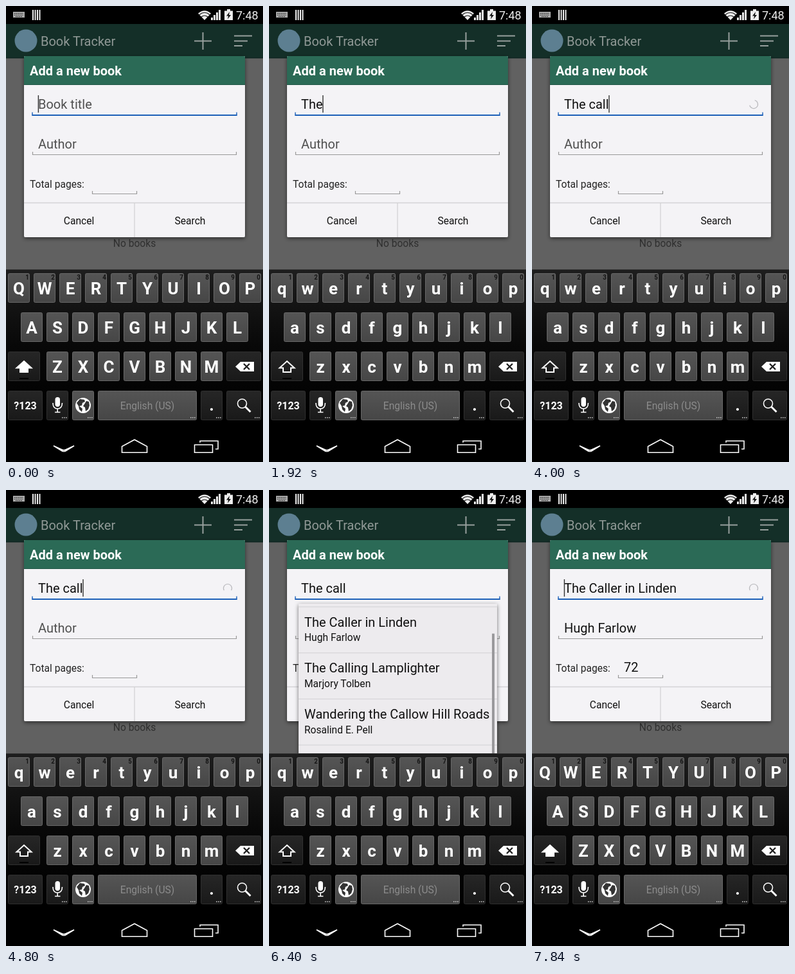
Animation, 400 px wide and 710 px high, one loop 8 s. Source, as an HTML page:

```html
<!DOCTYPE html>
<html lang="en">
<head>
<meta charset="utf-8">
<title>Add a new book</title>
<style>
html, body { margin: 0; width: 100%; height: 100%; overflow: hidden; background: #000; }
svg { display: block; width: 100vw; height: 100vh; }
text { font: 20px Roboto, "Noto Sans", sans-serif; white-space: pre; }
.small { font-size: 15.6px; }
.bold { font-weight: 700; }
.mid { text-anchor: middle; }
.letter { font-size: 26px; font-weight: 700; fill: #fff; text-anchor: middle; }
.line { fill: none; stroke: #fff; stroke-width: 1.6; }
</style>
</head>
<body>
<svg viewBox="0 0 400 710">
  <defs>
    <linearGradient id="light" x2="0" y2="1"><stop stop-color="#555"/><stop offset="1" stop-color="#464646"/></linearGradient>
    <linearGradient id="dark" x2="0" y2="1"><stop stop-color="#262626"/><stop offset="1" stop-color="#191919"/></linearGradient>
    <linearGradient id="board" x2="0" y2="1"><stop stop-color="#1e1e1e"/><stop offset=".5" stop-color="#080808"/><stop offset="1" stop-color="#000"/></linearGradient>
    <filter id="shadow" x="-10%" y="-10%" width="120%" height="120%"><feDropShadow dx="0" dy="2" stdDeviation="3" flood-opacity=".55"/></filter>
  </defs>
  <rect width="400" height="710"/>

  <!-- status bar -->
  <path d="M11 9h18v9H11z" fill="#aaa"/>
  <path d="M13 11.5h14M13 14h14M15 16.5h10" stroke="#111" stroke-dasharray="1.5 1.2"/>
  <path d="M42 6v16M45.500 6v16M49 6v16M52.500 6v16" stroke="#eee" stroke-width="2"/>
  <path d="M299 11.500Q309 3 319 11.500L309 22z" fill="#eee"/>
  <path d="M301 13.500Q309 7 317 13.500M304 17Q309 13 314 17" fill="none" stroke="#111" stroke-width="1.200"/>
  <path d="M320.500 22v-4M324.500 22v-8M328.500 22V10M332.500 22V6" stroke="#eee" stroke-width="3"/>
  <path d="M340 7.500h4V5h5v2.500h4V22h-13z" fill="#eee"/>
  <path d="M348 9l-5 6.500h3l-1 5 5-6.500h-3z" fill="#111"/>
  <text x="358" y="21" fill="#eee" style="font-size:18px">7:48</text>

  <!-- dimmed app -->
  <rect y="28" width="400" height="53" fill="#142f28"/>
  <rect y="81" width="400" height="330" fill="#616161"/>
  <rect y="80" width="400" height="1.500" fill="#0d2520"/>
  <circle cx="31" cy="54" r="17.500" fill="#5d7f91"/>
  <text x="54" y="62" fill="#909996">Book Tracker</text>
  <path d="M293 54.500h27M306.500 41v27M355 46.500h28M355 54.500h21M355 62h13" stroke="#97a09d" stroke-width="2"/>
  <text x="200" y="375" class="small mid" fill="#2f2f2f">No books</text>

  <!-- dialog -->
  <rect x="28" y="78" width="344" height="282" rx="2" fill="#f4f3f6" filter="url(#shadow)"/>
  <path d="M28 122V80q0-2 2-2h340q2 0 2 2v42z" fill="#2b6a56"/>
  <path d="M28 122.500h344" stroke="#1f5545"/>
  <text x="37" y="108" class="bold" fill="#fff">Add a new book</text>
  <path d="M41 165.500v4.500h318v-4.500" fill="none" stroke="#1b5fb8" stroke-width="1.400"/>
  <path d="M40.500 170h319" stroke="#1b5fb8" stroke-width="2.200"/>
  <path d="M41.500 227v4.500h317V227M134.500 288v4.500h69V288" fill="none" stroke="#989898" stroke-width="1.200"/>
  <text id="title" x="50" y="160"></text>
  <text id="author" x="50" y="222"></text>
  <text x="37" y="283" class="small" fill="#222">Total pages:</text>
  <text id="pages" x="143" y="283" fill="#111"></text>
  <rect id="caret" y="139" width="1.400" height="27" fill="#333"/>
  <path id="spinner" d="M3.250 5.630A6.500 6.500 0 1 1 3.250 -5.630" fill="none" stroke="#b9b9bd" stroke-width="1.200"/>
  <path d="M28 306.500h344M200 307v53" stroke="#d3d2d5" stroke-width="1.300"/>
  <text x="113.500" y="340" class="small mid" fill="#111">Cancel</text>
  <text x="286.500" y="340" class="small mid" fill="#111">Search</text>

  <!-- suggestions -->
  <g id="list">
    <rect x="46" y="177" width="309" height="260" fill="#edebee" filter="url(#shadow)"/>
    <svg x="46" y="177" width="309" height="240"><g id="rows"></g></svg>
    <rect id="thumb" x="347" width="4" height="240" fill="#9a999c"/>
  </g>

  <!-- keyboard -->
  <rect y="410" width="400" height="300"/>
  <rect y="410" width="400" height="238" fill="url(#board)"/>
  <path d="M0 410.500h400" stroke="#333"/>
  <g id="keys"></g>
  <path id="shift" d="M28 553l11.500 10.500H34v6.500H22v-6.500h-5.500z" stroke="#fff" stroke-width="2"/>
  <path d="M21 580h14" stroke="#000" stroke-width="2"/>
  <path d="M357 561.500l8-7.500h21v15h-21z" fill="#fff"/>
  <path d="M370 557l9 9m0-9l-9 9" stroke="#222" stroke-width="2.400"/>
  <text x="30" y="628" class="bold mid" fill="#fff" style="font-size:16px">?123</text>
  <rect x="76.500" y="609" width="7.500" height="15" rx="3.700" fill="#fff"/>
  <path d="M73 618q0 9 7.200 9t7.300-9M80.200 627v5M76 632.500h8.500" class="line"/>
  <circle cx="120" cy="622" r="12" fill="#fff"/>
  <path d="M110 618l5-6 7 1 1 3-4 2-1 4-4 1 5 4-1 5-4-4-1-5zM122 620l3-5 4 1 1 6-2 6-4 3-1-6-3-2z" fill="#333"/>
  <text x="220" y="627.500" class="small mid" fill="#8c8c8c">English (US)</text>
  <text x="320" y="630" class="letter">.</text>
  <circle cx="367.500" cy="619" r="7" class="line"/>
  <path d="M372.500 624l8 8" class="line" style="stroke-width:3"/>

  <!-- navigation bar -->
  <g transform="translate(0 .7)">
    <path d="M74 684l13 6q3 1.500 6 0l13-6-13 8q-3 1.500-6 0z" class="line"/>
    <path d="M180.500 694.500V685L200 674.500 219.500 685v9.500z" class="line"/>
    <path d="M293.500 682.500h28v12h-28zM302 679v-2.500h28V689h-4" class="line"/>
  </g>
</svg>
<script>
const $ = id => document.getElementById(id);
const LOOP = 8000, STEP = 160, PITCH = 71.7;

const books = [
  ["The Caller at Low Meadows", "Marc-Émile Vaubrond"],
  ["The Caller in Linden", "Hugh Farlow"],
  ["The Calling Lamplighter", "Marjory Tolben"],
  ["Wandering the Callow Hill Roads", "Rosalind E. Pell"],
  ["The Caller in Linden", "Hugh Farlow"]
];
const picked = books[1];

$("rows").innerHTML = books.map(([name, writer], i) => {
  const y = i * PITCH;
  return `<text x="9" y="${y + 30}" fill="#111">${name}</text>
    <text x="9" y="${y + 52.5}" class="small" fill="#111">${writer}</text>
    <path d="M0 ${y + 71}h309" stroke="#d2d1d4"/>`;
}).join("");

const key = (x, y, w, fill) => `<rect x="${x + .5}" y="${y + .5}" width="${w - 1}" height="45" rx="2"
  fill="url(#${fill})" stroke="${fill === "light" ? "#686868" : "#303030"}"/>`;
const dots = (right, y) =>
  `<path d="M${right - 10} ${y}h8" stroke="#ccc" stroke-width="1.500" stroke-dasharray="1.600 1.400"/>`;

let board = "";
[["QWERTYUIOP", 3, 416], ["ASDFGHJKL", 23, 477], ["ZXCVBNM", 63, 538]].forEach(([row, left, y], r) => {
  [...row].forEach((c, i) => {
    const x = left + i * 40;
    board += key(x, y, 34, "light") + `<text class="letter" x="${x + 17}" y="${y + 33}">${c}</text>`;
    if (r === 0) board += `<text class="bold mid" x="${x + 30}" y="${y + 10}" fill="#161616" style="font-size:10px">${(i + 1) % 10}</text>`;
  });
});
board += key(3, 538, 50, "dark") + key(343, 538, 54, "dark") + key(3, 599, 54, "dark");
[[63, 34, "dark"], [103, 34, "light"], [143, 154, "light"], [303, 34, "dark"], [343, 54, "dark"]]
  .forEach(([x, w, fill]) => board += key(x, 599, w, fill) + dots(x + w, 641));
$("keys").innerHTML = board;
const letters = [...$("keys").querySelectorAll(".letter")];

// time of each keystroke
const strokes = [1120, 1440, 1760, 2240, 2720, 3040, 3360, 3680];
const query = "The call";
const LIST_ON = 5280, PICK = 7360, RELOAD = 7520;

const show = (id, on) => $(id).setAttribute("visibility", on ? "visible" : "hidden");
function field(id, value, hint) {
  $(id).textContent = value || hint;
  $(id).setAttribute("fill", value ? "#111" : "#505050");
}

function draw(t) {
  const done = t >= PICK;
  const count = strokes.filter(s => s <= t).length;
  const typed = query.slice(0, count);
  const listed = t >= LIST_ON && !done;

  field("title", done ? picked[0] : typed, "Book title");
  field("author", done ? picked[1] : "", "Author");
  $("pages").textContent = done ? "72" : "";

  const edit = done ? PICK : count ? strokes[count - 1] : -360;
  $("caret").setAttribute("x", 49.7 + (count && !done ? $("title").getComputedTextLength() : 0));
  show("caret", (t - edit) % 1000 < 500);

  show("spinner", t >= 3040 && t < LIST_ON || t >= RELOAD);
  const spun = t - (done ? RELOAD : 3200);
  $("spinner").setAttribute("transform", `translate(345 153) rotate(${spun / 1280 * 360})`);

  const caps = done || !count;
  letters.forEach(l => l.textContent = caps ? l.textContent.toUpperCase() : l.textContent.toLowerCase());
  $("shift").setAttribute("fill", caps ? "#fff" : "none");

  $("list").style.display = listed ? "" : "none";
  const p = Math.min(1, Math.max(0, (t - 5760) / 800));
  const scroll = 73.7 * p * p * (3 - 2 * p);
  $("rows").setAttribute("transform", `translate(0 ${-scroll})`);
  $("thumb").setAttribute("y", 180 + scroll * .66);
}

const start = performance.now();
function tick() {
  const t = (performance.now() - start) % LOOP;
  draw(Math.floor(t / STEP) * STEP);
  requestAnimationFrame(tick);
}
tick();
</script>
</body>
</html>
```
